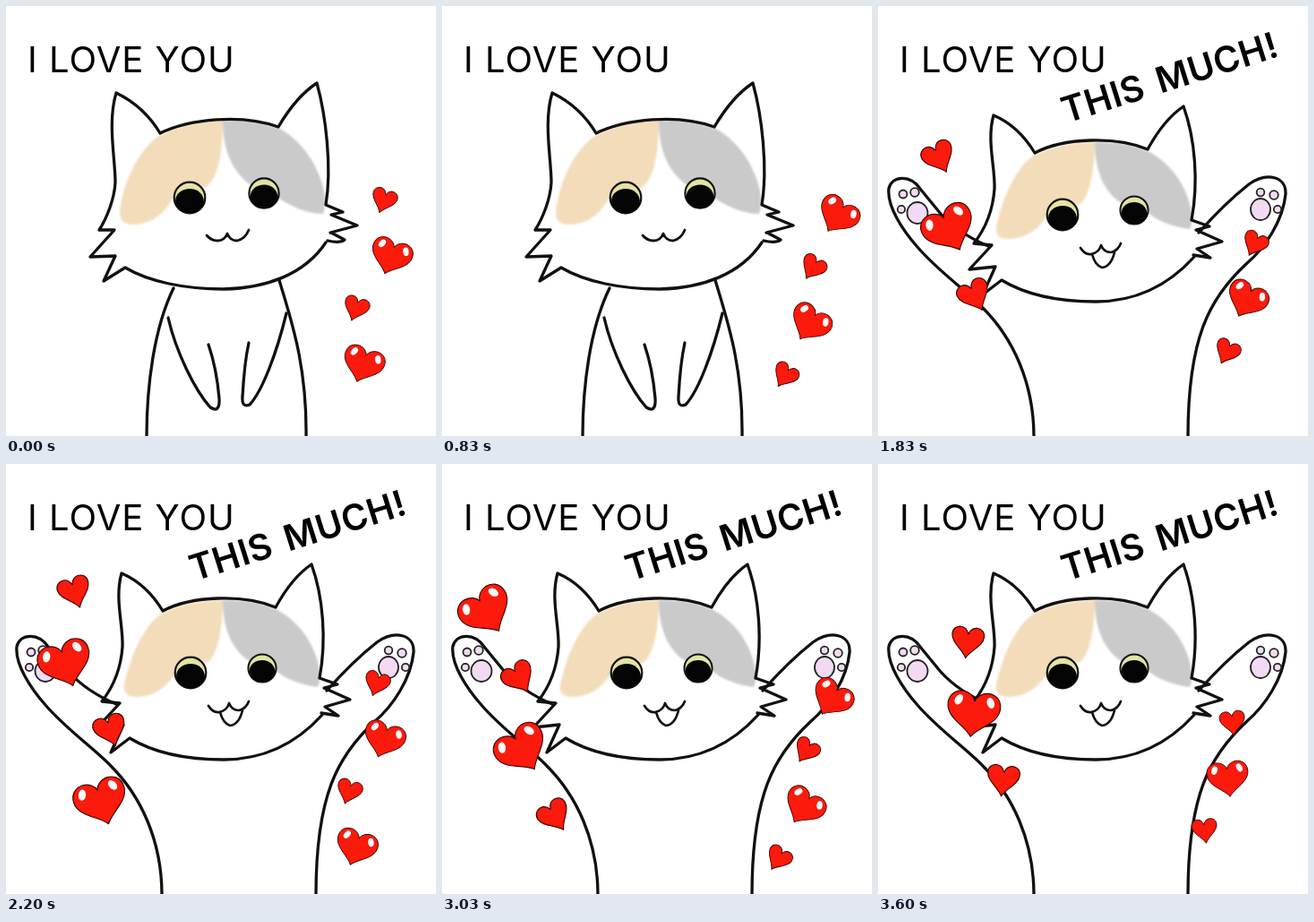
An HTML page for the animation above (3.63 s loop, 480 by 480 pixels).

```html
<!DOCTYPE html>
<html lang="en">
<head>
<meta charset="utf-8">
<title>I love you this much</title>
<style>
html, body { margin: 0; width: 100%; height: 100%; overflow: hidden; background: #fff; }
svg { display: block; width: 100vw; height: 100vh; }
text { font-family: Inter, "Open Sans", sans-serif; font-size: 40px; letter-spacing: 1px; }
.shout { font-weight: 600; letter-spacing: .4px; word-spacing: 5px; }
.ink { fill: none; stroke: #111; stroke-width: 3.3; stroke-linecap: round; stroke-linejoin: round; }
.pad { fill: #f2daf3; stroke: #222; stroke-width: 1.8; }
.peach { fill: #f3dcba; }
.grey { fill: #cacaca; }
.heart { fill: #fb1a0c; stroke: #3a0500; stroke-width: .9; stroke-linejoin: round; }
</style>
</head>
<body>
<svg viewBox="0 0 480 480">
  <defs>
    <filter id="soft"><feGaussianBlur stdDeviation="0.9"/></filter>
    <g id="eye">
      <circle r="17.3" fill="#e3e3a4" stroke="#111" stroke-width="2.2"/>
      <path d="M-16 4C-16 -5 -8 -10 0 -10C9 -10 16 -4 16 5C15 13 8 17 0 17C-8 17 -15 12 -16 4Z" fill="#050505"/>
    </g>
    <g id="big">
      <path class="heart" d="M0 20C-6 11 -23 6 -23 -7C-23 -16 -16 -19 -11 -19C-5 -18.500 -1 -15 0 -11C1 -15 5 -18.500 11 -19C16 -19 23 -16 23 -7C23 6 6 11 0 20Z"/>
      <ellipse cx="-14" cy="-11" rx="3.2" ry="4.8" fill="#fff" transform="rotate(25 -14 -11)"/>
      <ellipse cx="14" cy="-11" rx="3.2" ry="4.8" fill="#fff" transform="rotate(-25 14 -11)"/>
    </g>
    <path id="small" class="heart" d="M0 14C-3 7 -14 2 -14 -6C-14 -11 -10 -13 -7 -13C-3 -13 -1 -10 0 -7C1 -10 3 -13 7 -13C10 -13 14 -11 14 -6C14 2 3 7 0 14Z"/>
  </defs>

  <text x="24" y="74">I LOVE YOU</text>

  <g id="calm">
    <g filter="url(#soft)">
      <path class="peach" d="M172 144Q203 128 242 128C242 165 236 196 222 203L190 207C181 228 166 243 143 244C129 244 125 238 128 222C133 194 148 160 172 144Z"/>
      <path class="grey" d="M242 128Q275 126 304 136C330 150 348 176 355 206Q358 222 354 232C337 232 318 224 302 213L272 199C252 184 242 160 242 128Z"/>
    </g>
    <use href="#eye" x="205" y="214"/>
    <use href="#eye" transform="translate(288 209) scale(.96)"/>
    <g class="ink">
      <path d="M172 142Q154 112 123 97C113 130 122 170 122 197C121 215 113 236 104 250L121 250L94 280L122 279L109 307L133 292C160 308 200 316 243 316C290 315 333 300 357 264M172 142C205 126 263 120 304 135Q324 101 347 86C357 122 364 180 357 222L376 230L363 233L392 245L362 253M359 262Q373 265 378 261L363 253"/>
      <path d="M224 256Q229 262 236 262Q244 262 247 254Q250 262 258 262Q267 260 271 250" stroke-width="2.8"/>
      <path d="M187 315C165 360 157 425 157 481M305 306C318 350 336 400 335 481"/>
      <path d="M181 348C190 387 211 429 228 448Q239 455 238 438Q235 404 226 378M313 343C302 388 286 430 272 445Q263 449 264 436Q266 399 271 376"/>
    </g>
  </g>

  <g id="glad">
    <text class="shout" transform="translate(210 131) rotate(-17.5)">THIS MUCH!</text>
    <g filter="url(#soft)">
      <path class="peach" d="M175 166Q205 152 242 152C242 185 236 215 224 222L192 226C185 246 166 260 146 260C132 260 129 253 134 238C141 211 154 180 175 166Z"/>
      <path class="grey" d="M242 152Q275 150 301 162C326 175 343 198 349 225Q352 241 348 249C330 247 312 240 300 230L270 219C252 206 242 184 242 152Z"/>
    </g>
    <use href="#eye" x="206" y="233"/>
    <use href="#eye" transform="translate(286 228) scale(.9)"/>
    <g class="ink">
      <path d="M175 164Q157 134 129 122C121 150 131 180 130 204C128 232 118 251 107 265L127 267L102 294L131 291L117 322L138 306C166 323 204 330 243 330C287 330 324 312 353 280M175 164C207 147 265 145 301 160Q319 127 341 112C354 148 358 196 350 239L370 246L355 250L384 263L356 271L371 281L352 278"/>
      <path d="M226 270Q231 278 238 277Q247 275 249 267Q252 275 260 275Q268 273 271 265M239 277Q242 289 250 292Q260 291 264 275" stroke-width="2.700"/>
      <path d="M123 268Q90 254 70 232L47 204C37 189 16 188 12 204C10 224 28 251 44 269C67 296 98 317 117 337C150 370 174 420 174 481"/>
      <path d="M358 253C374 235 395 214 414 199C434 185 456 190 455 210C452 240 432 270 411 288C370 326 346 370 346 481"/>
    </g>
    <g class="pad">
      <ellipse cx="44" cy="231" rx="11.500" ry="12"/>
      <circle cx="28" cy="210" r="4.500"/><circle cx="41" cy="208" r="4.800"/><circle cx="26" cy="227" r="4.200"/>
      <ellipse cx="427" cy="227" rx="11" ry="12"/>
      <circle cx="427" cy="208" r="4.300"/><circle cx="442" cy="211" r="4.800"/><circle cx="446" cy="227" r="4.200"/>
    </g>
  </g>

  <g id="right"></g>
  <g id="left" transform="translate(606.5 -171) scale(-1.28 1.28)"></g>
</svg>
<script>
const LOOP = 3630, SWITCH = 1800;
const GAP = 120.5, RISE = 0.055, SWAY = 1095, LEAN = 0.258, TOP = 200;
const $ = id => document.getElementById(id);

// dy: offset in the column, x/amp/peak: sideways sway
const kinds = [
  { id: 'big', dy: 0, x: 492.5, amp: 13, peak: 960 },
  { id: 'small', dy: 58, x: 479.5, amp: 10, peak: 790 }
];
const scenes = [
  { y: 280, big: [219, 406], small: [206, 415] },
  { y: 308.5, big: [250, 430], small: [230, 444] }
];

const hearts = [];
for (const side of ['right', 'left'])
  for (const kind of kinds)
    for (let i = 0; i < 3; i++) {
      const el = document.createElementNS('http://www.w3.org/2000/svg', 'use');
      el.setAttribute('href', '#' + kind.id);
      $(side).append(el);
      hearts.push({ el, kind, i });
    }

const wave = (t, peak) => Math.cos((t - peak) / SWAY * 2 * Math.PI);
const mod = (a, b) => ((a % b) + b) % b;
const show = (el, on) => { el.style.display = on ? '' : 'none'; };

function draw(t) {
  const glad = t >= SWITCH, scene = scenes[+glad];
  show($('calm'), !glad);
  show($('glad'), glad);
  show($('left'), glad);
  const tilt = 13 + 20 * wave(t, 880);
  for (const { el, kind, i } of hearts) {
    const y = TOP + mod(scene.y + kind.dy - RISE * t - TOP, GAP) + GAP * i;
    const x = kind.x + kind.amp * wave(t, kind.peak) - LEAN * y;
    const [min, max] = scene[kind.id];
    show(el, y > min && y < max);
    el.setAttribute('transform', `translate(${x} ${y}) rotate(${tilt})`);
  }
}

const start = performance.now();
function tick() {
  draw((performance.now() - start) % LOOP);
  requestAnimationFrame(tick);
}
tick();
</script>
</body>
</html>
```
